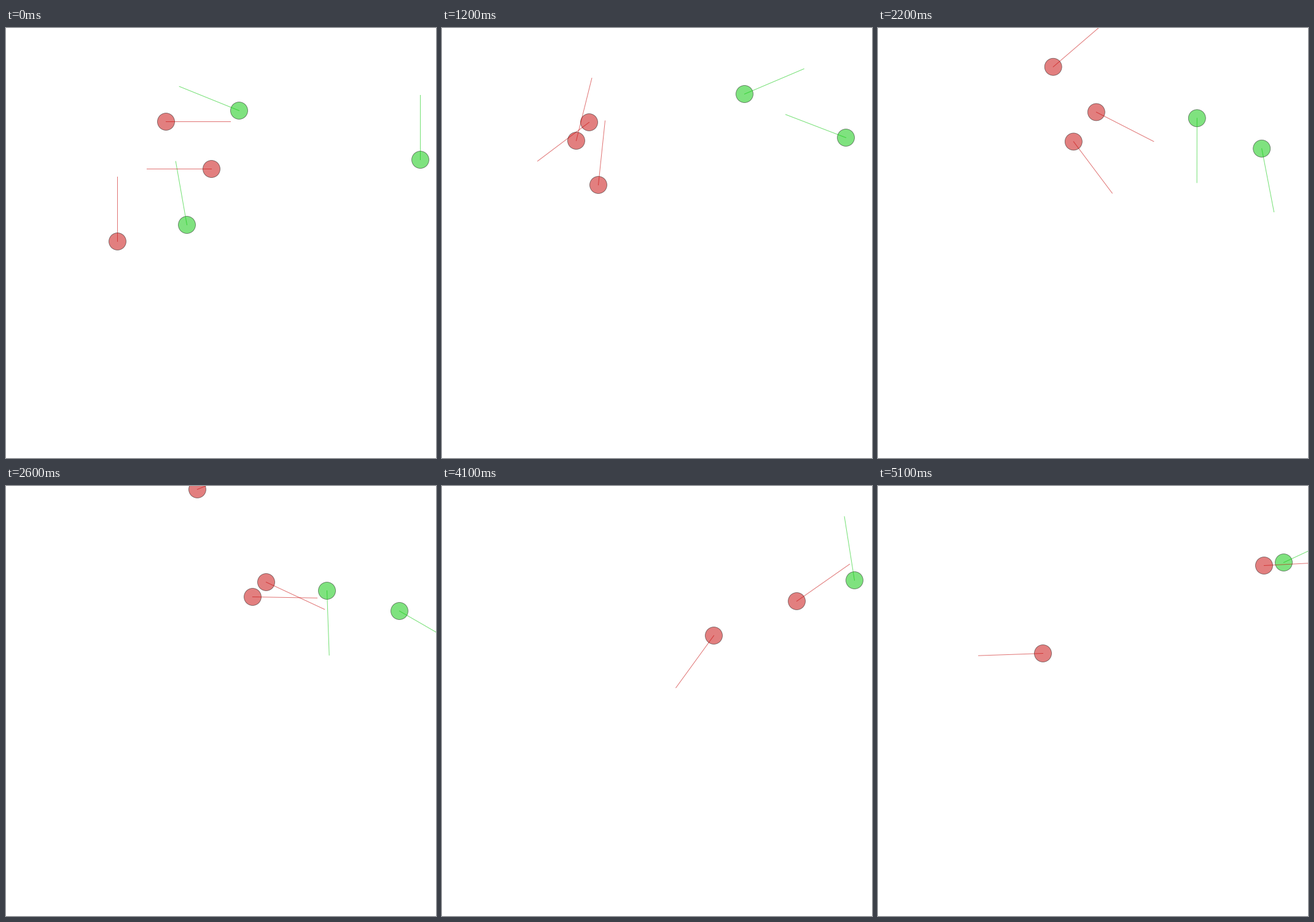
Write a matplotlib script that moves like this. It is 700 px wide and 700 px high and loops after 5200 ms.

```python
import numpy as np
import matplotlib.pyplot as plt
from matplotlib.animation import FuncAnimation
from matplotlib.patches import Circle

SIZE, FRAMES, STEP = 700, 52, 100
RADIUS, SIGHT = 14, 105
GREEN, RED = (0, 0.78, 0), (0.78, 0, 0)
PREY_SPEED, HUNTER_SPEED = 6, 12

# Steps at which every living agent has a key pose: x, y, heading in degrees
KEYS = np.array([0, 12, 18, 26, 34, 41, 51])
PREY = [
    [(379, 134, 202), (492, 107, -23), (513, 123, 75), (522, 170, 88),
     (504, 216, 98)],
    [(294, 320, 260), (265, 345, -20)],
    [(674, 214, -90), (657, 178, -159), (626, 185, -233), (640, 203, -330),
     (661, 192, -438), (671, 153, -459), (660, 124, -385)],
]
HUNTERS = [
    [(260, 152, 0), (239, 153, -217), (246, 169, 58), (401, 180, 1),
     (459, 198, 50), (442, 243, 126), (268, 272, 178)],
    [(181, 347, -90), (254, 255, -84), (270, 133, -63.5), (311, 5, -22),
     (440, -60, -30)],
    [(334, 229, 180), (218, 183, 284), (285, 122, 372), (423, 156, 385),
     (531, 183, 380), (577, 187, 325), (628, 129, 357)],
]
CAUGHT_AT = {1: 8}  # prey caught between two key poses


def forward(heading):
    a = np.radians(heading)
    return np.stack([np.cos(a), np.sin(a)], axis=-1)


def hermite(t, values, slopes, steps):
    i = np.clip(np.searchsorted(t, steps, side="right") - 1, 0, len(t) - 2)
    span = (t[i + 1] - t[i])[:, None]
    u = (steps - t[i])[:, None] / span
    return ((1 + 2 * u) * (1 - u) ** 2 * values[i]
            + u * (1 - u) ** 2 * span * slopes[i]
            + u ** 2 * (3 - 2 * u) * values[i + 1]
            + u ** 2 * (u - 1) * span * slopes[i + 1])


def travel(poses, speed):
    """Positions and headings per step; agents pass key poses moving forward."""
    poses = np.array(poses, float)
    t = KEYS[:len(poses)]
    steps = np.arange(t[-1] + 1)
    place, turn = poses[:, :2], poses[:, 2:]
    xy = hermite(t, place, speed * forward(poses[:, 2]), steps)
    heading = hermite(t, turn, np.gradient(turn, t, axis=0), steps)[:, 0]
    return xy, heading


class Agent:
    def __init__(self, ax, poses, color, speed, z, end=FRAMES):
        xy, heading = travel(poses, speed)
        self.start = xy[:end]
        self.tip = (xy + SIGHT * forward(heading))[:end]
        self.body = ax.add_patch(Circle(
            (0, 0), RADIUS, facecolor=color + (0.5,),
            edgecolor=(0, 0, 0, 0.5), linewidth=0.6, zorder=z))
        self.ray, = ax.plot([], [], color=color, alpha=0.55, linewidth=0.72,
                            snap=False, zorder=z + 0.5)

    def show(self, step):
        alive = step < len(self.start)
        self.body.set_visible(alive)
        self.ray.set_visible(alive)
        if alive:
            self.body.center = self.start[step]
            self.ray.set_data(*zip(self.start[step], self.tip[step]))


fig = plt.figure(figsize=(7, 7), dpi=100, facecolor="white")
ax = fig.add_axes([0, 0, 1, 1])
ax.set_xlim(-0.5, SIZE - 0.5)
ax.set_ylim(SIZE - 0.5, -0.5)
ax.axis("off")

agents = [Agent(ax, p, GREEN, PREY_SPEED, 1 + i, CAUGHT_AT.get(i, FRAMES))
          for i, p in enumerate(PREY)]
agents += [Agent(ax, p, RED, HUNTER_SPEED, 10 + i)
           for i, p in enumerate(HUNTERS)]


def draw(step):
    for agent in agents:
        agent.show(step)
    return [part for a in agents for part in (a.body, a.ray)]


anim = FuncAnimation(fig, draw, frames=FRAMES, interval=STEP,
                     init_func=lambda: draw(0), repeat=True, repeat_delay=0)
plt.show()
```
